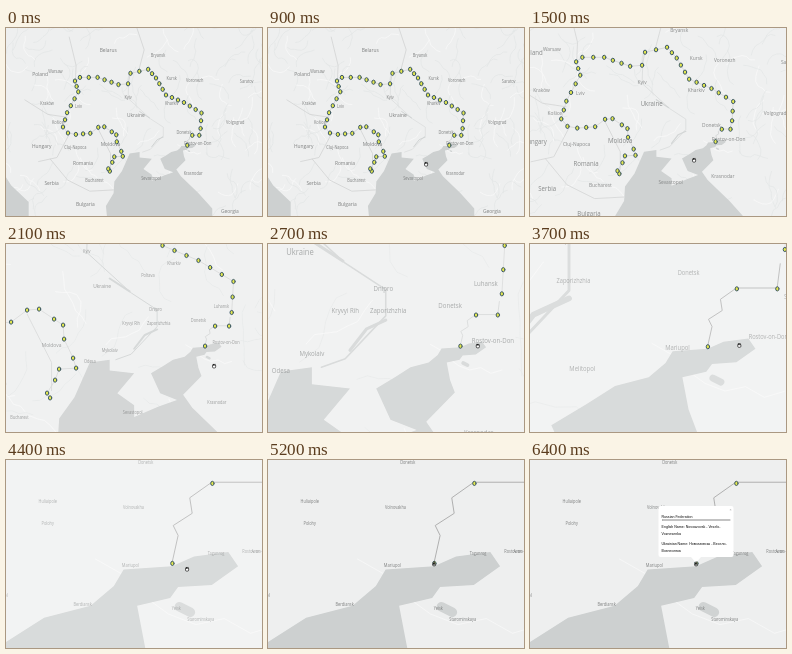
Animation of 256x188 px, one loop 7.6 s. Source, as an HTML page with a canvas:

```html
<!DOCTYPE html>
<html lang="en">
<head>
<meta charset="utf-8">
<title>Border crossings map</title>
<style>
  html, body { margin: 0; width: 100%; height: 100%; overflow: hidden; background: #eee; }
  canvas { display: block; width: 100vw; height: 100vh; }
</style>
</head>
<body>
<canvas id="stage"></canvas>
<script>
const W = 256, H = 188, LOOP = 7600;
const ASPECT = 0.815; // the map is narrower than true Mercator
const canvas = document.getElementById('stage');
const ctx = canvas.getContext('2d');
const ratio = Math.max(1, window.devicePixelRatio || 1);
canvas.width = W * ratio;
canvas.height = H * ratio;

// Each zoom doubles the map around the pointer.
const anchors = [[163.5, 132.5], [211, 102], [208, 101]];
const FIRST_ZOOM = 1200, ZOOM_EVERY = 1050, ZOOM_TIME = 850;
const zoomView = (v, [ax, ay], k) => ({ s: v.s * k, x: ax - (ax - v.x) * k, y: ay - (ay - v.y) * k });
const views = [{ s: 1, x: 0, y: 0 }];
anchors.forEach((at, i) => views.push(zoomView(views[i], at, 2)));

const pairs = list => list.trim().split(/\s+/).map(p => p.split(',').map(Number));
const mercator = lat => Math.log(Math.tan(Math.PI / 4 + lat * Math.PI / 360)) * 180 / Math.PI;
const project = (lon, lat) =>
  [181.25 + (lon - 38.23) * 7.65, 117.25 - (mercator(lat) - mercator(47.1)) * 9.35];
const geo = list => pairs(list).map(p => project(...p));

const seas = [
  geo(`28,40 27.6,42.5 28.6,43.5 28.7,44.4 29.7,45.2 30.7,46.5 32,46.6 32,46.2 33.6,46.1 32.5,45.35
    33.6,44.9 33.6,44.45 35.2,44.85 36.4,45.1 35.3,45.35 34.7,46.1 35.5,46.37 36.14,46.6 36.9,46.71
    37.28,46.89 37.44,47.04 38.23,47.07 38.59,47.16 39.15,47.2 39.31,47.07 38.88,46.9 38.33,46.88
    38.2,46.78 37.66,46.71 37.8,46.3 38,46 36.8,45.3 37.4,44.8 39.7,43.5 41.5,42.3 41.5,40`),
  geo('14,45.2 15.2,44.1 17.5,42.8 17.5,40 14,40')
];

// Border route; crossings are spread evenly along each leg.
const route = pairs(`103.8,143.2 102.3,140.8 106.3,134.3 108.3,128.8 116.8,128.3 115.3,123.3
  110.8,113.8 110.3,106.8 105.8,103.8 98.3,98.8 92.3,99.3 84.3,105.3 69.9,106.4 62,105 57,99
  61.1,84.7 72.3,63.8 69,53 74,49.4 91.6,49.4 112.5,56.6 122.1,55.8 124.5,45.3 142.2,41.3
  150,50 160,67 178,74.5 195.5,85 194.6,100.5 193.3,107.3 186.3,107.3 181.3,117.3`);
const crossings = route.flatMap(([x, y], i) => {
  const [nx, ny] = route[i + 1] || [x, y];
  const count = Math.max(1, Math.round(Math.hypot(nx - x, ny - y) / 7.5));
  return Array.from({ length: count }, (_, n) => [x + (nx - x) * n / count, y + (ny - y) * n / count]);
});

const eastBorder = geo(`38.23,47.1 38.33,47.35 38.25,47.44 38.56,47.55 38.52,47.69
  38.88,47.83 39.8,47.83 39.87,48.13`);
const borders = [
  route.slice(0, -3),
  geo('23.6,51.5 23.7,52.6 22.8,54.4'),
  geo('22.5,49.1 20,49.3 17,50.3'),
  geo('22.9,48 21.2,46.2 18.8,45.9'),
  geo('20.3,46.1 22.6,44.5 25.5,43.65 28.6,43.75'),
  geo('26.6,48.25 28.2,46.5 28.2,45.45'),
  geo('31.8,52.1 32.6,53.6 30.9,56')
];
const waters = [
  { width: 0.5, points: geo('30.6,52 30.5,50.4 33.4,49 35.1,48.4 35.1,47.8 33.4,46.8 32.4,46.6') },
  { width: 1, points: geo('32,49.5 33.3,49.05') },
  { width: 1, points: geo('35.1,47.7 34.3,47.5 33.6,47') },
  { width: 1.2, points: geo('38.35,46.7 38.53,46.65') }
];

// Places by the zoom levels that show them
const places = [
  { from: 0, to: 1, size: 6, names: `Belarus 27.9 53.5|Poland 19 52|Romania 24.6 45.7|Hungary 19.2 47|
    Ukraine 31.5 49.2|Moldova 28.2 47.1|Serbia 20.5 44.2|Bulgaria 24.9 42.6|Georgia 43.8 42` },
  { from: 0, to: 3, size: 4.8, names: `Warsaw 21 52.2|Kraków 19.9 50|Košice 21.3 48.7|
    Cluj-Napoca 23.6 46.9|Lviv 24 49.8|Kyiv 30.5 50.4|Bryansk 34.4 53.2|Kursk 36.2 51.7|
    Voronezh 39.2 51.6|Kharkiv 36.2 50|Saratov 46 51.5|Donetsk 37.8 48|Rostov-on-Don 39.6 47.2|
    Krasnodar 39 45|Sevastopol 33.5 44.6|Volgograd 44.5 48.7|Bucharest 26.1 44.4` },
  { from: 1, to: 3, size: 4.8, names: `Mykolaiv 32 46.9|Dnipro 35 48.4|Zaporizhzhia 35.2 47.9|
    Luhansk 39.3 48.5|Poltava 34.5 49.6|Odesa 30.7 46.5|Kryvyi Rih 33.4 47.9` },
  { from: 2, to: 3, size: 5, names: `Mariupol 37.55 47.07|Kherson 32.6 46.6|Melitopol 35.4 46.8|
    Shakhty 40.2 47.7` },
  { from: 3, to: 3, size: 4.8, names: `Taganrog 38.95 47.18|Berdiansk 36.77 46.72|Yeisk 38.3 46.68|
    Polohy 36.2 47.45|Huliaipole 36.2 47.65|Azov 39.6 47.2|Starominskaya 38.7 46.58|Volnovakha 37.6 47.6` }
].flatMap(({ names, ...group }) => names.split('|').map(entry => {
  const [, name, lon, lat] = entry.trim().match(/^(.+) (\S+) (\S+)$/);
  return { ...group, name, at: project(+lon, +lat) };
}));

// Quiet network of district lines and roads
let seed = 7;
const random = () => (seed = seed * 16807 % 2147483647) / 2147483647;
const roads = Array.from({ length: 160 }, () => {
  let x = random() * 280 - 10, y = random() * 200 - 5, angle = random() * 6.28;
  return Array.from({ length: 8 }, () => {
    angle += random() * 1.4 - 0.7;
    return [x += Math.cos(angle) * 3.6, y += Math.sin(angle) * 4.4];
  });
});

// Timelines: [time, value...]
const pointerTrack = [[200, 264, 150], [900, 158, 136], [1200, 164, 132], [2000, 164, 132],
  [2100, 208, 122], [2250, 210, 102], [4150, 209, 101], [4400, 181, 109], [5000, 181, 109],
  [5200, 166, 103]];
const detailTrack = [[1200, 1], [2000, 0.75], [3200, 0.55], [4400, 0.55], [5200, 1]];
const popupTrack = [[5700, 0], [6200, 1]];

function track(keys, t) {
  const next = keys.findIndex(k => k[0] > t);
  if (next < 0) return keys[keys.length - 1].slice(1);
  if (next === 0) return keys[0].slice(1);
  const a = keys[next - 1], b = keys[next], p = (t - a[0]) / (b[0] - a[0]);
  return a.slice(1).map((v, i) => v + (b[i + 1] - v) * p);
}

function viewAt(t) {
  const i = Math.min(anchors.length - 1, Math.floor((t - FIRST_ZOOM) / ZOOM_EVERY));
  if (i < 0) return { view: views[0], level: 0 };
  const p = Math.min(1, (t - FIRST_ZOOM - i * ZOOM_EVERY) / ZOOM_TIME);
  const eased = p ** 3 * (6 * p * p - 15 * p + 10);
  return { view: zoomView(views[i], anchors[i], 1 + eased), level: p < 1 ? i : i + 1 };
}

const use = (s, x, y) => ctx.setTransform(s * ratio, 0, 0, s * ratio, x * ratio, y * ratio);

function trace(points) {
  ctx.beginPath();
  points.forEach(([x, y]) => ctx.lineTo(x, y));
}
function line(points, color, width) {
  trace(points);
  ctx.strokeStyle = color;
  ctx.lineWidth = width;
  ctx.stroke();
}
function write(text, x, y, font, color) {
  ctx.save();
  ctx.translate(x, y);
  ctx.scale(ASPECT, 1);
  ctx.font = font;
  ctx.fillStyle = color;
  ctx.fillText(text, 0, 0);
  ctx.restore();
}

function drawMap(view, level, detail) {
  const px = 1 / view.s;
  use(view.s, view.x, view.y);
  ctx.lineJoin = ctx.lineCap = 'round';
  roads.forEach((r, i) => line(r, i % 3 ? '#e3e5e5' : '#f9f9f9', 0.7 * px));
  ctx.fillStyle = '#cdd0d0';
  seas.forEach(s => { trace(s); ctx.fill(); });
  waters.forEach(w => line(w.points, '#d0d3d3', w.width));
  borders.forEach(b => line(b, '#d2d4d4', 0.8 * px));
  line(eastBorder, level > 1 ? '#a9a9a9' : '#d2d4d4', 0.9 * px);

  use(1, 0, 0);
  ctx.fillStyle = `rgba(255,255,255,${(1 - detail) * 0.5})`;
  ctx.fillRect(0, 0, W, H);

  // Labels grow with their level's tiles until the next level takes over.
  const growth = view.s / views[level].s;
  ctx.globalAlpha = detail;
  ctx.textAlign = 'center';
  places.filter(p => p.from <= level && level <= p.to).forEach(({ name, at, size }) =>
    write(name, at[0] * view.s + view.x, at[1] * view.s + view.y + 1,
      `${size * growth}px "Open Sans", sans-serif`, '#7c7e7e'));
  ctx.globalAlpha = 1;
}

function drawCrossings(view) {
  ctx.fillStyle = '#e2e64e';
  ctx.strokeStyle = '#2d4b60';
  ctx.lineWidth = 0.9;
  crossings.forEach(([x, y]) => {
    ctx.beginPath();
    ctx.ellipse(x * view.s + view.x, y * view.s + view.y, 1.7, 2.1, 0, 0, 7);
    ctx.fill();
    ctx.stroke();
  });
}

function drawPopup(alpha) {
  if (!alpha) return;
  ctx.globalAlpha = alpha;
  ctx.fillStyle = '#fff';
  ctx.beginPath();
  ctx.roundRect(128.5, 46, 75, 51, 2);
  ctx.moveTo(161, 97);
  ctx.lineTo(166, 103);
  ctx.lineTo(171, 97);
  ctx.fill();
  ctx.textAlign = 'left';
  const font = '4.4px "Liberation Sans", Arial, sans-serif';
  [['Russian Federation', 57.5], ['English Name: Novoazovsk - Veselo-', 67.5], ['Voznesenka', 75],
   ['Ukrainian Name: Новоазовськ - Весело-', 84.5], ['Вознесенка', 92]]
    .forEach(([text, y]) => write(text, 131.5, y, font, '#000'));
  write('×', 199.5, 51, font, '#999');
  line([[132, 60], [200, 60]], '#555', 0.7);
  ctx.globalAlpha = 1;
}

function drawPointer(x, y, pointing) {
  use(0.75, x, y);
  ctx.fillStyle = '#fff';
  ctx.strokeStyle = '#111';
  ctx.lineWidth = 0.9;
  ctx.beginPath();
  if (pointing) ctx.roundRect(-0.9, -1.5, 1.6, 4, 0.8);
  ctx.roundRect(-2, pointing ? 0.8 : -1.6, 4.2, pointing ? 3 : 4.4, 1.4);
  ctx.fill();
  ctx.stroke();
  if (!pointing) [-1.4, 0, 1.4].forEach(dx => line([[dx, -2.2], [dx, -0.6]], '#111', 0.7));
}

function frame(now) {
  const t = now % LOOP;
  const { view, level } = viewAt(t);
  use(1, 0, 0);
  ctx.fillStyle = '#eeefef';
  ctx.fillRect(0, 0, W, H);
  drawMap(view, level, track(detailTrack, t)[0]);
  drawCrossings(view);
  drawPopup(track(popupTrack, t)[0]);
  drawPointer(...track(pointerTrack, t), t >= 5150);
  requestAnimationFrame(frame);
}
requestAnimationFrame(frame);
</script>
</body>
</html>
```
